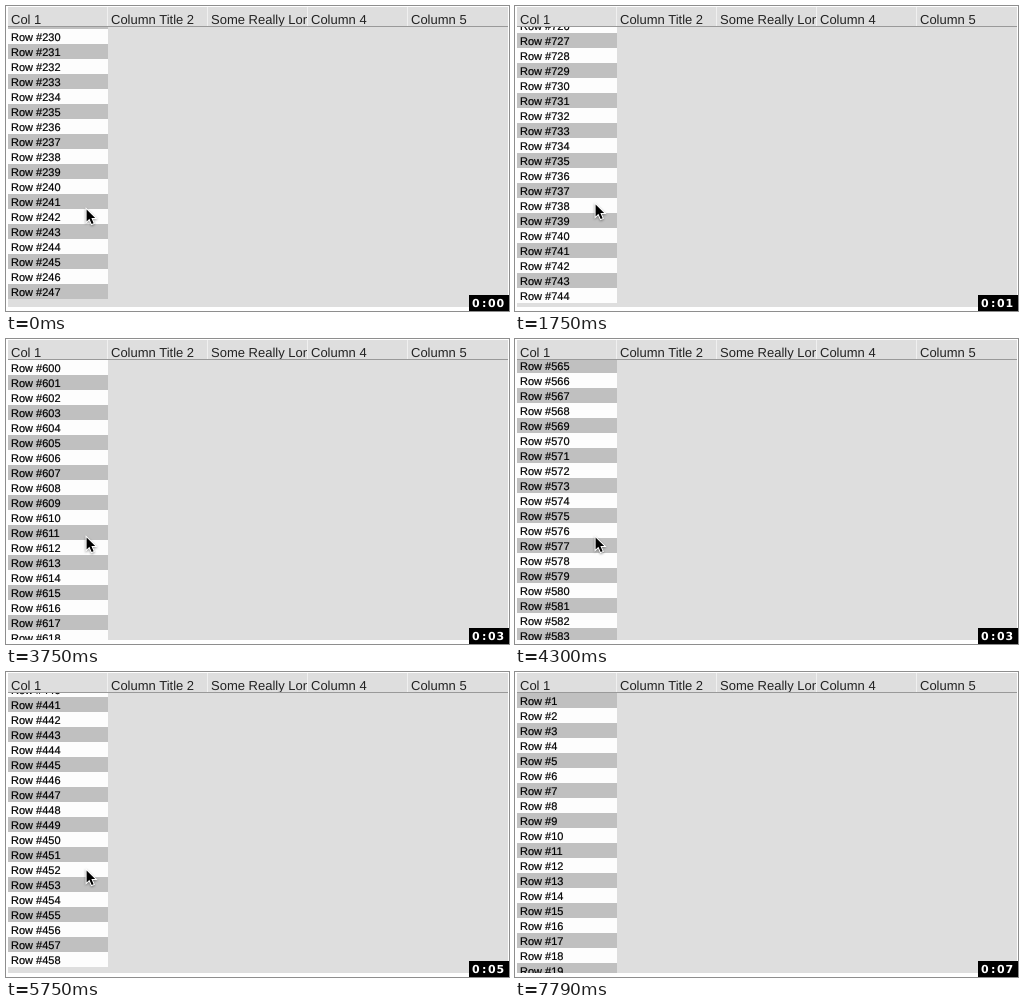
An HTML page that plays this animation: 503 px wide and 305 px high, repeating every 8.39 s.

```html
<!DOCTYPE html>
<html lang="en">
<head>
<meta charset="utf-8">
<title>Scrolling table</title>
<style>
  html, body { margin: 0; width: 100%; height: 100%; overflow: hidden; background: #fff; }
  svg { display: block; width: 503px; height: 305px; }
  text { font-family: "Liberation Sans", Arial, sans-serif; white-space: pre; text-rendering: geometricPrecision; }
  .head text { font-size: 13px; fill: #222; }
  .rows text { font-size: 11px; fill: #000; stroke: #000; stroke-width: 0.2px; }
  .clock text { font: bold 11px "DejaVu Sans", sans-serif; fill: #fff; }
  #cursor { filter: drop-shadow(0 1px 1px #0006); }
</style>
</head>
<body>
<svg viewBox="0 0 503 305">
  <defs>
    <clipPath id="view"><rect x="2" y="21" width="100" height="280"/></clipPath>
  </defs>
  <rect width="503" height="305" fill="#fff"/>
  <rect x="2" y="1" width="500" height="300" fill="#dedede"/>
  <g class="rows" clip-path="url(#view)"></g>
  <g class="head"></g>
  <path id="cursor" d="M0.6 1.6V13.4L3.4 10.8L5.7 16L7.6 15.2L5.4 10.1H9.2Z" fill="#000" stroke="#fff" stroke-width="2" paint-order="stroke"/>
  <g class="clock">
    <rect x="463" y="289" width="40" height="16"/>
    <text id="time" x="466 476 482 490.5" y="300.5"></text>
  </g>
</svg>
<script>
const LOOP = 8390, ROW = 15, TOP = 21, VISIBLE = 19, TOTAL = 1000;
const CLOCK_RATE = 0.91;

// Scroll keys: [ms, offset px, speed px/ms]
const KEYS = [
  [450, 3433, 0], [1150, 6378, 6.4], [2450, 14720, 2],
  [3050, 14720, 0], [3750, 8985, -1.7], [4900, 8322, -0.3],
  [6490, 4145, -3], [7040, 0, -6], [LOOP, 0, 0]
];

const ticks = [0];
const run = (start, ...gaps) => {
  ticks.push(start);
  for (const gap of gaps) ticks.push(start += gap);
};
const steps = n => Array(n).fill(150);
run(600, ...steps(3), 100, ...steps(6), 100, ...steps(2));
run(3200, 100, ...steps(6), 100, ...steps(7), 100, ...steps(6), 140, 100, ...steps(3));
run(7490, ...steps(2));

const svgNode = (parent, tag, attrs, text = '') => {
  const node = document.createElementNS('http://www.w3.org/2000/svg', tag);
  for (const name in attrs) node.setAttribute(name, attrs[name]);
  node.textContent = text;
  return parent.appendChild(node);
};

const head = document.querySelector('.head');
const titles = ['Col 1', 'Column Title 2', 'Some Really Long Column Title', 'Column 4', 'Column 5'];
titles.forEach((title, i) => {
  const x = 2 + i * 100;
  const clip = svgNode(head, 'clipPath', { id: 'col' + i });
  svgNode(clip, 'rect', { x, y: 0, width: 99, height: 20 });
  svgNode(head, 'text', { x: x + 3, y: 18, 'clip-path': `url(#col${i})` }, title);
  if (i) svgNode(head, 'rect', { x: x - 1, y: 1, width: 1, height: 19, fill: '#f0f0f0' });
});
svgNode(head, 'rect', { x: 2, y: 20, width: 500, height: 1, fill: '#999' });

const body = document.querySelector('.rows');
const rows = Array.from({ length: VISIBLE }, () => ({
  band: svgNode(body, 'rect', { x: 2, width: 100, height: ROW }),
  label: svgNode(body, 'text', { x: 5 })
}));
const cursor = document.getElementById('cursor');
const time = document.getElementById('time');

function scrollAt(t) {
  const i = KEYS.findIndex(key => key[0] > t);
  if (i === 0) return KEYS[0][1];
  const [t0, a, va] = KEYS[i - 1], [t1, b, vb] = KEYS[i];
  if (a === b) return a;
  const d = t1 - t0, u = (t - t0) / d, w = 1 - u;
  const y = a * w * w * (1 + 2 * u) + b * u * u * (3 - 2 * u) + d * u * w * (va * w - vb * u);
  return Math.round(Math.max(0, Math.min(TOTAL * ROW - 280, y)));
}

function cursorAt(t) {
  if (t < 600) return [80, 202];
  if (t < 7490) return [80, 197];
  if (t < 7640) return [155, 222];
  return t < 7790 ? [198, 245] : null;
}

function draw(now) {
  const t = ticks.findLast(tick => tick <= now);
  const offset = scrollAt(t), first = Math.floor(offset / ROW);
  rows.forEach(({ band, label }, i) => {
    const number = first + i + 1, y = TOP + (first + i) * ROW - offset;
    band.setAttribute('y', y);
    band.setAttribute('fill', number > TOTAL ? 'none' : number % 2 ? '#c0c0c0' : '#fdfdfd');
    label.setAttribute('y', y + 12);
    label.textContent = number > TOTAL ? '' : 'Row #' + number;
  });
  const tip = cursorAt(t);
  cursor.setAttribute('visibility', tip ? 'visible' : 'hidden');
  if (tip) cursor.setAttribute('transform', `translate(${tip})`);
  time.textContent = '0:' + String(Math.floor(t * CLOCK_RATE / 1000)).padStart(2, '0');
}

const start = performance.now();
function loop() {
  draw((performance.now() - start) % LOOP);
  requestAnimationFrame(loop);
}
loop();
</script>
</body>
</html>
```
